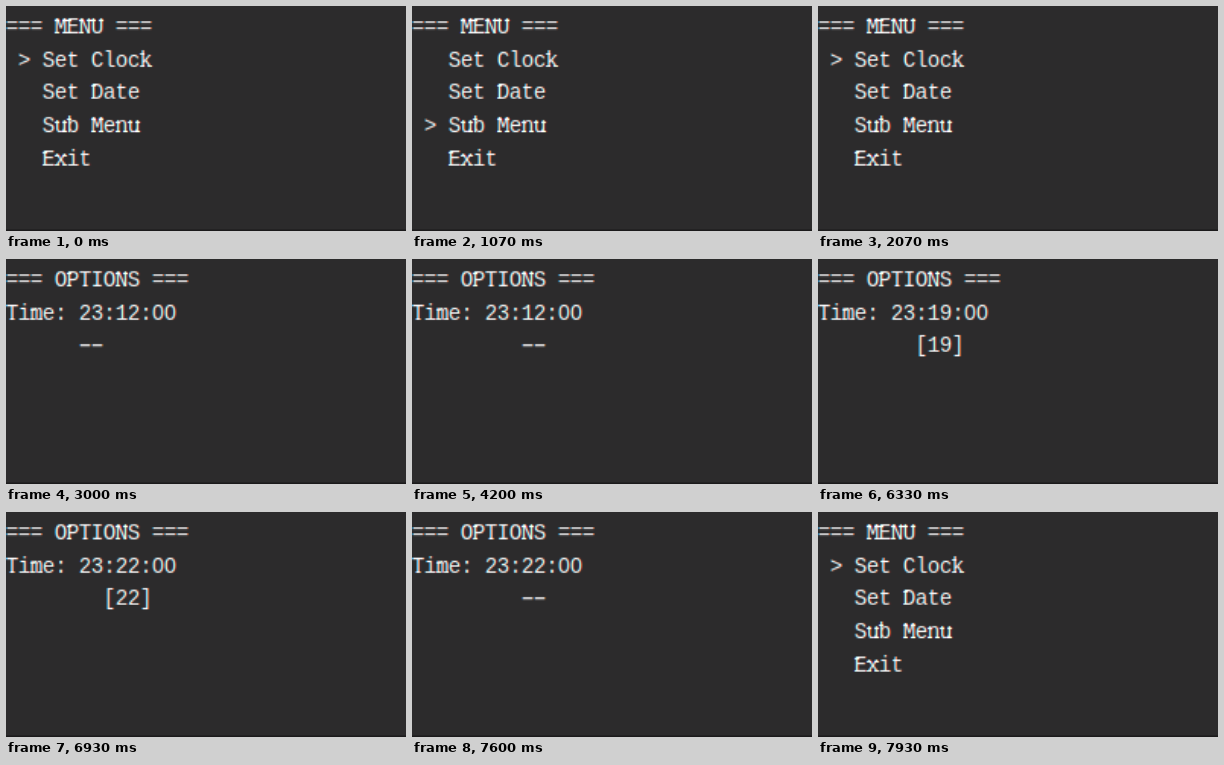
An HTML page with a canvas for the animation above (8 s loop, 400 by 225 pixels).

```html
<!DOCTYPE html>
<html lang="en">
<head>
<meta charset="utf-8">
<title>Menu</title>
<style>
  html, body { margin: 0; width: 100%; height: 100%; overflow: hidden; background: #2c2b2c; }
  canvas { display: block; width: 400px; height: 225px; }
</style>
</head>
<body>
<canvas id="screen" width="263" height="148"></canvas>
<script>
const ctx = document.getElementById('screen').getContext('2d');
const LOOP = 8000, CELL = 8;

// Slab serifs per letter: digit = row * 3 + column (rows: cap top, x-height, foot)
const SERIFS = {
  M: '0268', N: '026', U: '02', E: '06', D: '06', P: '06', T: '7',
  k: '068', b: '0', n: '368', u: '358', x: '3568', m: '368'
};
const SERIF_Y = [-9, -7, -1];
const SERIF_X = [0, 2.5, 5];

const CURSOR_MOVES = [[800, 1], [1000, 2], [1200, 3], [1600, 2], [1800, 1], [2000, 0]];
const MINUTE_TURNS = [5400, 5730, 5870, 6000, 6130, 6230, 6330, 6470, 6600, 6800];

function drawChar(ch, x, base) {
  if (ch === '-') {
    ctx.fillRect(x + 0.7, base - 5, 6.6, 1.3);
    return;
  }
  // The sans zero has no inner dot
  const family = ch === '0' ? '"Liberation Sans"' : '"Liberation Mono"';
  ctx.font = `14px ${family}, monospace`;
  ctx.fillText(ch, x + CELL / 2, base);
  for (const s of SERIFS[ch] || '') {
    ctx.fillRect(x + SERIF_X[s % 3], base + SERIF_Y[Math.floor(s / 3)], 3, 1);
  }
}

function drawLines(lines, dx) {
  lines.forEach((line, row) => {
    const base = Math.round(17.8 + 21.7 * row);
    [...line].forEach((ch, col) => {
      if (ch !== ' ') drawChar(ch, col * CELL + dx, base);
    });
  });
}

function menuLines(t) {
  let selected = 0;
  for (const [at, row] of CURSOR_MOVES) if (t >= at) selected = row;
  const items = ['Set Clock', 'Set Date', 'Sub Menu', 'Exit'];
  return ['=== MENU ===', ...items.map((s, i) => (i === selected ? ' > ' : '   ') + s)];
}

function optionLines(t) {
  const minute = 12 + MINUTE_TURNS.filter(at => t >= at).length;
  const editing = t >= 4670 && t < 7400;
  const marker = editing ? `[${minute}]`.padStart(12) : '--'.padStart(t < 4200 ? 8 : 11);
  return ['=== OPTIONS ===', `Time: 23:${minute}:00`, marker];
}

function draw(t) {
  ctx.globalCompositeOperation = 'source-over';
  ctx.fillStyle = '#2c2b2c';
  ctx.fillRect(0, 0, 263, 148);
  ctx.fillStyle = '#151315';
  ctx.fillRect(0, 147.3, 263, 0.7);

  const lines = t >= 3000 && t < 7930 ? optionLines(t) : menuLines(t);
  // Subpixel colour fringes
  ctx.globalCompositeOperation = 'lighter';
  ctx.textAlign = 'center';
  [['#d00000', 0.33], ['#00d000', 0], ['#0000d0', -0.33]].forEach(([color, dx]) => {
    ctx.fillStyle = color;
    drawLines(lines, dx);
  });
}

const start = performance.now();
function tick() {
  draw((performance.now() - start) % LOOP);
  requestAnimationFrame(tick);
}
tick();
</script>
</body>
</html>
```
